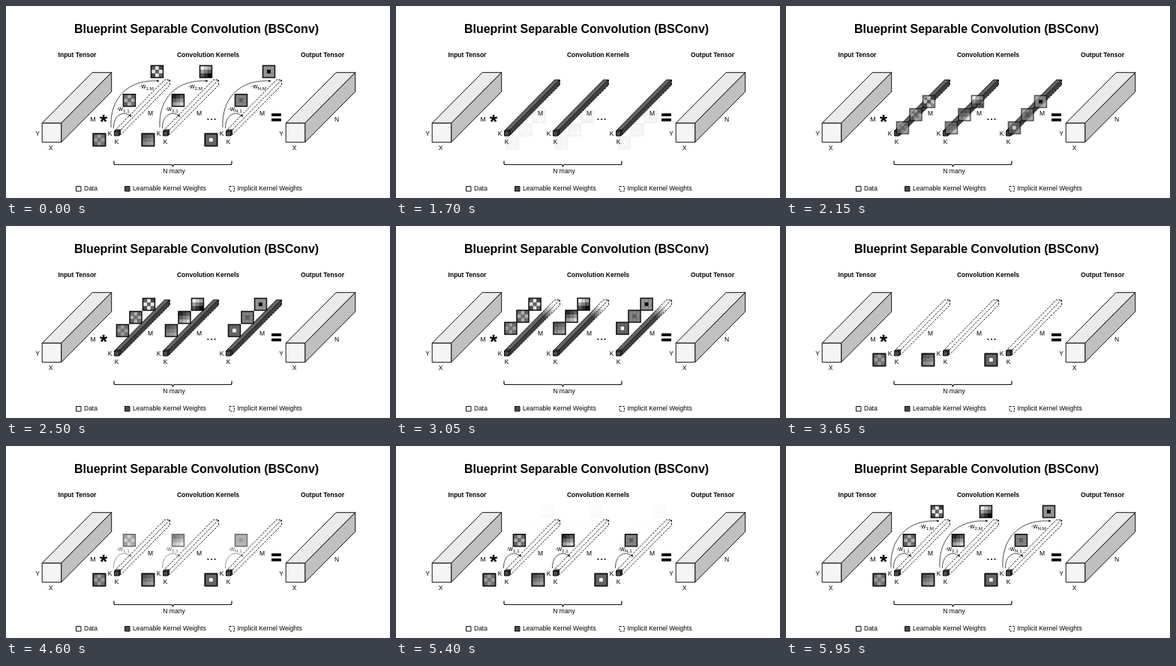
An HTML page for the animation above (6.95 s loop, 512 by 256 pixels).

```html
<!DOCTYPE html>
<html lang="en">
<head>
<meta charset="utf-8">
<title>Blueprint Separable Convolution</title>
<style>
  html, body { margin: 0; width: 100%; height: 100%; overflow: hidden; background: #fff; }
  svg { display: block; width: 100%; height: 100%; }
  text { font: 8.5px "Liberation Sans", Arial, sans-serif; fill: #000; }
  .mid { text-anchor: middle; }
  .bold { font-weight: bold; }
  .title { font-size: 16px; }
  .star { font-size: 26px; }
  .dots { font-size: 17px; }
  .sub { font-size: 6.2px; }
  .edge { stroke: #111; stroke-width: 1; stroke-linejoin: round; }
  .bar .edge { stroke-width: .8; }
  .thin { fill: none; stroke: #222; stroke-width: .8; }
  .bracket { fill: none; stroke: #111; stroke-width: 1.2; }
  .dash { fill: #fff; stroke: #111; stroke-width: 1; stroke-dasharray: 2.6 1.5; }
</style>
</head>
<body>
<svg id="stage" viewBox="0 0 512 256">
  <defs>
    <linearGradient id="wipe" gradientUnits="userSpaceOnUse" x1="215" y1="101" x2="148" y2="169">
      <stop id="wipeStart" stop-color="#000"/>
      <stop id="wipeEnd" stop-color="#fff"/>
    </linearGradient>
    <mask id="barMask" maskUnits="userSpaceOnUse" x="130" y="80" width="110" height="110">
      <rect x="130" y="80" width="110" height="110" fill="url(#wipe)"/>
    </mask>
    <marker id="arrow" viewBox="0 0 6 6" refX="5" refY="3" markerWidth="5" markerHeight="5" orient="auto">
      <path d="M0 .5L6 3L0 5.5Z" fill="#222"/>
    </marker>
  </defs>
</svg>
<script>
const LOOP = 6950, STEP = 50;
const stage = document.getElementById('stage');
const columns = [{ x: 0, name: '1' }, { x: 65, name: '2' }, { x: 149, name: 'N' }];
const LIGHT = ['#f5f5f5', '#ebebeb', '#c0c0c0'];
const DARK = ['#4c4c4c', '#646464', '#404040'];

function add(parent, tag, attrs = {}, content = '') {
  const el = document.createElementNS('http://www.w3.org/2000/svg', tag);
  for (const key in attrs) el.setAttribute(key, attrs[key]);
  el.textContent = content;
  return parent.appendChild(el);
}
const group = (parent, x = 0, y = 0) => add(parent, 'g', { transform: `translate(${x} ${y})` });
const label = (parent, x, y, content, cls = 'mid') => add(parent, 'text', { x, y, class: cls }, content);
const poly = (parent, points, fill) => add(parent, 'polygon', { points, fill, class: 'edge' });

function cuboid(parent, x, y, size, dx, dy, [front, top, side]) {
  const r = x + size, b = y + size;
  poly(parent, [x, y, x + dx, y - dy, r + dx, y - dy, r, y], top);
  poly(parent, [r, y, r + dx, y - dy, r + dx, b - dy, r, b], side);
  poly(parent, [x, y, r, y, r, b, x, b], front);
}

// Relative weight of each kernel cell, before scaling.
const kernels = [
  { scales: [.3, .5, 1], cell: (i, j) => (i + j) % 2 ? .9 : -.25 - .1 * Math.abs(i - j) },
  { scales: [.35, .75, -1], cell: (i, j) => (i + 2 * j) / 3 - 1 },
  { scales: [1, -.25, -1], cell: (i, j) => i === 1 && j === 1 ? 1.1 : -.2 }
];

function patch(parent, x, y, col, row) {
  const g = group(parent, x, y), { scales, cell } = kernels[col];
  const outer = 17.5, border = 1.6, size = (outer - 2 * border) / 3;
  add(g, 'rect', { width: outer, height: outer, fill: '#111' });
  for (let i = 0; i < 3; i++) for (let j = 0; j < 3; j++) {
    const v = Math.max(0, Math.min(255, 125 + 115 * scales[row] * cell(i, j)));
    add(g, 'rect', {
      x: border + i * size, y: border + j * size,
      width: size + .1, height: size + .1, fill: `rgb(${v},${v},${v})`
    });
  }
  return g;
}

function weight(parent, x, y, index) {
  const text = label(parent, x, y, '·w', '');
  add(text, 'tspan', { class: 'sub', dy: 2 }, index);
}

// Fixed parts
label(stage, 254, 36, 'Blueprint Separable Convolution (BSConv)', 'mid bold title');
label(stage, 95, 68, 'Input Tensor', 'mid bold');
label(stage, 269.5, 68, 'Convolution Kernels', 'mid bold');
label(stage, 422, 68, 'Output Tensor', 'mid bold');
for (const x of [0, 325]) {
  cuboid(stage, 48.2 + x, 156.2, 25.5, 67, 67.5, LIGHT);
  label(stage, 42 + x, 173, 'Y');
  label(stage, 59.5 + x, 192, 'X');
}
label(stage, 116, 154, 'M');
label(stage, 441, 154, 'N');
label(stage, 130, 163, '*', 'mid bold star');
label(stage, 274, 151.5, '...', 'mid dots');
for (const y of [143.2, 150]) add(stage, 'rect', { x: 354, y, width: 13, height: 3.7, fill: '#000' });
add(stage, 'path', { class: 'bracket', d: 'M144 206.500v3q0 2 2 2H220.500q2 0 2 3q0-3 2-3H299q2 0 2-2v-3' });
label(stage, 224, 223, 'N many');
add(stage, 'rect', { x: 93.5, y: 240.5, width: 6.5, height: 6.5, fill: LIGHT[0], class: 'edge' });
add(stage, 'rect', { x: 158.5, y: 240.5, width: 6.5, height: 6.5, fill: DARK[0], class: 'edge' });
add(stage, 'rect', { x: 298, y: 240.5, width: 6.5, height: 6.5, class: 'dash' });
label(stage, 104, 246.2, 'Data', '');
label(stage, 169, 246.2, 'Learnable Kernel Weights', '');
label(stage, 308.4, 246.2, 'Implicit Kernel Weights', '');

// Kernel columns
const bars = [], samples = [], firstWeights = [], lastWeights = [];
columns.forEach(({ x, name }, col) => {
  const g = group(stage, x);
  add(g, 'path', { class: 'dash', d: 'M144.500 166.500L211.500 98.500H218.500V105.500L151.500 173V166.500L218.500 98.500' });
  const bar = add(g, 'g', { class: 'bar', mask: 'url(#barMask)' });
  cuboid(bar, 144.5, 166.5, 6.5, 67, 68, DARK);
  bars.push(bar);
  cuboid(g, 144.5, 167, 6, 2, 2, DARK);
  label(g, 138.5, 172.5, 'K');
  label(g, 147.5, 184, 'K');
  label(g, 192.5, 145.5, 'M');

  const first = group(g), last = group(g);
  add(first, 'path', { class: 'thin', 'marker-end': 'url(#arrow)', d: 'M143.500 163C143 146 156 138 167 147.500' });
  weight(first, 147, 140, name + ',1');
  patch(first, 155.7, 117, col, 1);
  firstWeights.push(first);
  add(last, 'path', { class: 'thin', 'marker-end': 'url(#arrow)', d: 'M140 162C138 124 162 97 204 100' });
  weight(last, 177.5, 110, name + ',M');
  patch(last, 192.7, 78.7, col, 2);
  lastWeights.push(last);

  for (const row of [2, 1, 0]) samples.push({ row, el: patch(g, 0, 0, col, row) });
});

const progress = (t, from, to) => Math.max(0, Math.min(1, (t - from) / (to - from)));
const smooth = p => (1 - Math.cos(Math.PI * p)) / 2;
const mix = (a, b, p) => a + (b - a) * p;
const fade = (items, value) => items.forEach(el => el.setAttribute('opacity', value));

function draw(time) {
  const t = Math.floor(time % LOOP / STEP) * STEP;
  const ended = t < 450;
  const rise = smooth(progress(t, 1670, 2760));
  const gather = ended ? 1 : smooth(progress(t, 2915, 3650));
  const shown = ended ? 1 : progress(t, 1660, 2350);

  for (const { row, el } of samples) {
    const x = mix(146.7 + 17.5 * row, 115.7, gather);
    const y = mix(mix(174, 124, rise) - 17.5 * row, 169.7, gather);
    el.setAttribute('transform', `translate(${x} ${y})`);
    el.setAttribute('opacity', shown);
  }

  const wipe = ended ? 1 : progress(t, 2880, 3600), soft = .2;
  const edge = mix(-soft, 1, wipe);
  // Stop offsets clamp to 0..1, so the leading colour is blended by hand.
  const start = Math.max(0, edge), lead = Math.round(255 * Math.max(0, -edge) / soft);
  wipeStart.setAttribute('offset', start);
  wipeStart.setAttribute('stop-color', `rgb(${lead},${lead},${lead})`);
  wipeEnd.setAttribute('offset', Math.min(1, edge + soft));
  bars.forEach(bar => bar.setAttribute('visibility', wipe < 1 ? 'visible' : 'hidden'));

  fade(firstWeights, ended ? 1 : progress(t, 4300, 4800));
  fade(lastWeights, ended ? 1 : progress(t, 5390, 5950));
}

const wipeStart = document.getElementById('wipeStart');
const wipeEnd = document.getElementById('wipeEnd');
const began = performance.now();
function tick() {
  draw(performance.now() - began);
  requestAnimationFrame(tick);
}
tick();
</script>
</body>
</html>
```
